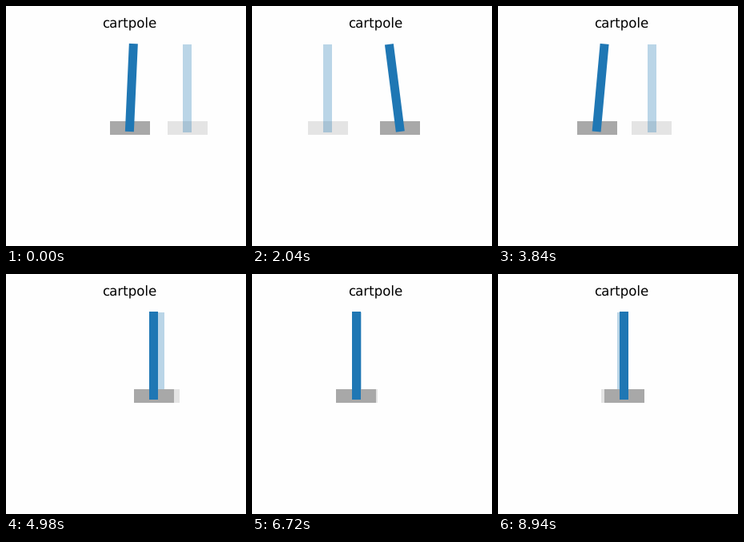
Recreate the animation shown at these times as a matplotlib script. Size 300 by 300 pixels, loop 9000 ms.

```python
import numpy as np
import matplotlib.pyplot as plt
from matplotlib.animation import FuncAnimation
from matplotlib.patches import Polygon, Rectangle

SIZE, DPI = 300, 100
FRAMES, INTERVAL = 150, 60
HOLD = 30                                # frames per goal
CART_W, CART_H, POLE_W, POLE_L = 50, 17, 11, 110
CART_TOP, PIVOT_Y, GHOST_PIVOT_Y = 143.6, 151.5, 152.1
GRAY, BLUE = "#a8a8a8", "#1f77b4"

# goal, cart after the first kick, point it runs to, final resting point
MOVES = [
    (226.8, 154.6, 227.6, 227.6),
    (94.8, 237, 95.5, 93.8),
    (192.2, 86, 187.6, 184.5),
    (131.8, 197, 126, 131),
    (154.2, 129, 153.4, 157.6),
]


def smoothstep(u):
    u = np.clip(u, 0, 1)
    return u * u * (3 - 2 * u)


def state(frame):
    k, n = divmod(frame, HOLD)
    goal, start, reach, rest = MOVES[k]
    run = reach - start
    x = reach - run * np.exp(-(n / 6.3) ** 1.7)
    x += (rest - reach) * smoothstep((n - 14) / 10)
    # The pole leans into the run, then straightens
    lean = 0.00092 * run * np.exp(-(n - 3.2) ** 2 / 26)
    return goal, x, lean


def pole_corners(x, y, lean):
    half = POLE_W / 2
    low, high = -half, POLE_L - half
    c, s = np.cos(lean), np.sin(lean)
    box = [(-half, low), (half, low), (half, high), (-half, high)]
    return [(x + a * c + b * s, y + a * s - b * c) for a, b in box]


plt.rcParams["text.hinting"] = "none"
fig = plt.figure(figsize=(SIZE / DPI, SIZE / DPI), dpi=DPI,
                 facecolor="#fefefe")
ax = fig.add_axes([0, 0, 1, 1])
ax.set(xlim=(0, SIZE), ylim=(SIZE, 0))
ax.axis("off")
fig.text(0.5125, 0.88 + 6 / 72 * DPI / SIZE, "cartpole", fontsize=12,
         family="DejaVu Sans", ha="center", va="baseline")


def add_cart(alpha, z):
    cart = Rectangle((0, CART_TOP), CART_W, CART_H, fc=GRAY, lw=0,
                     alpha=alpha, zorder=z)
    pole = Polygon(pole_corners(0, 0, 0), fc=BLUE, lw=0, alpha=alpha,
                   zorder=z + 1)
    return ax.add_patch(cart), ax.add_patch(pole)


def place(parts, x, y, lean):
    cart, pole = parts
    cart.set_x(x - CART_W / 2)
    pole.set_xy(pole_corners(x, y, lean))


ghost = add_cart(0.3, 1)
actor = add_cart(1, 3)


def draw(frame):
    goal, x, lean = state(frame)
    place(ghost, goal, GHOST_PIVOT_Y, 0)
    place(actor, x, PIVOT_Y, lean)
    return ghost + actor


anim = FuncAnimation(fig, draw, frames=FRAMES, interval=INTERVAL,
                     repeat=True, repeat_delay=0)
plt.show()
```
